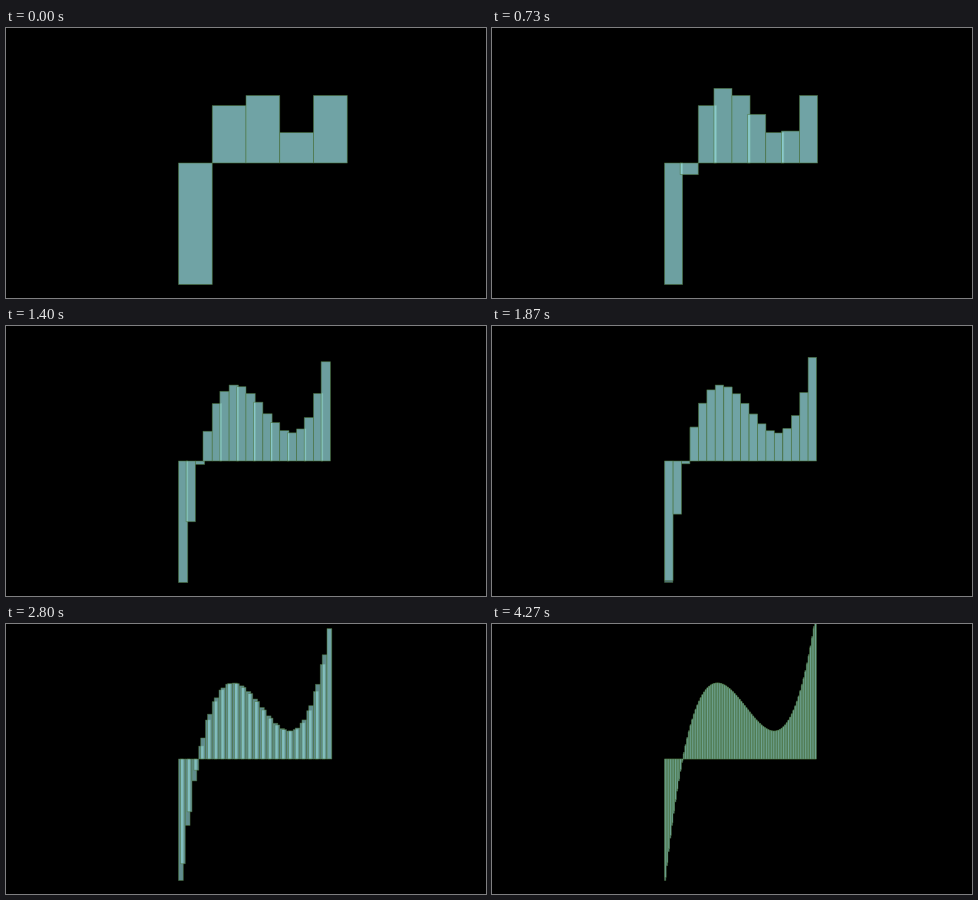
Write a matplotlib script that moves like this. It is 480 px wide and 270 px high and loops after 4.34 s.

```python
import matplotlib.pyplot as plt
import numpy as np
from matplotlib.animation import FuncAnimation
from matplotlib.collections import PolyCollection

W, H, DPI = 480, 270, 100
UNIT = H / 8                      # pixels per plane unit
ORIGIN = W / 2 + 2 * UNIT, H / 2
LOOP, TICK, FPS = 4340, 20, 15
X_MIN, X_MAX = -4.0, 0.5
WIDTHS = [1, 0.5, 0.25, 0.2, 0.1, 0.05, 0.025]
START, PERIOD, MOVE = 4, 11.25, 8  # in steps of 1/15 s
OPACITY = 0.75
FILL = np.array([150, 219, 221]) / 255
STROKE = np.array([72, 112, 58]) / 255


def curve(x):
    return 0.6 * x**3 + 2.9 * x**2 + 3.4 * x + 2


def smooth(t, k=10):
    sig = lambda v: 1 / (1 + np.exp(-v))
    low = sig(-k / 2)
    return np.clip((sig(k * (t - 0.5)) - low) / (1 - 2 * low), 0, 1)


def bars(dx):
    """Left-sampled Riemann bars as rows of left, right, height."""
    count = int(np.ceil((X_MAX - X_MIN) / dx - 1e-6))
    x = X_MIN + dx * np.arange(count)
    return np.column_stack([x, x + dx, curve(x)])


SETS = [bars(dx) for dx in WIDTHS]


def state(step):
    """Bars and their opacities at a given step."""
    phase = (step - START) / PERIOD
    i = int(np.floor(phase))
    if i < 0:
        return SETS[0], np.full(len(SETS[0]), OPACITY)
    p = smooth(min((phase - i) * PERIOD / MOVE, 1))
    old, new = SETS[i], SETS[i + 1]
    parent = np.arange(len(new)) * len(old) // len(new)
    copies = np.bincount(parent)[parent]
    # stacked copies together start at the opacity of a single bar
    alpha = 1 - (1 - OPACITY) ** (1 / copies)
    return old[parent] * (1 - p) + new * p, alpha * (1 - p) + OPACITY * p


def tint(color, alpha):
    return np.column_stack([np.tile(color, (len(alpha), 1)), alpha])


fig = plt.figure(figsize=(W / DPI, H / DPI), dpi=DPI, facecolor="black")
ax = fig.add_axes([0, 0, 1, 1])
ax.set_xlim(0, W)
ax.set_ylim(H, 0)
ax.axis("off")
shapes = PolyCollection([], linewidths=0.75 * 72 / DPI, snap=False,
                        joinstyle="miter")
ax.add_collection(shapes, autolim=False)


def draw(k):
    step = int((k * TICK + TICK / 2) * FPS / 1000)
    rows, alpha = state(step)
    left, right = (ORIGIN[0] + UNIT * rows[:, :2]).T
    base = np.full(len(rows), ORIGIN[1])
    top = base - UNIT * rows[:, 2]
    verts = np.stack([np.column_stack([left, base]),
                      np.column_stack([left, top]),
                      np.column_stack([right, top]),
                      np.column_stack([right, base])], axis=1)
    shapes.set_verts(verts)
    shapes.set_facecolor(tint(FILL, alpha))
    shapes.set_edgecolor(tint(STROKE, alpha))
    return [shapes]


anim = FuncAnimation(fig, draw, frames=LOOP // TICK, interval=TICK,
                     init_func=lambda: draw(0), repeat=True, repeat_delay=0)
plt.show()
```
